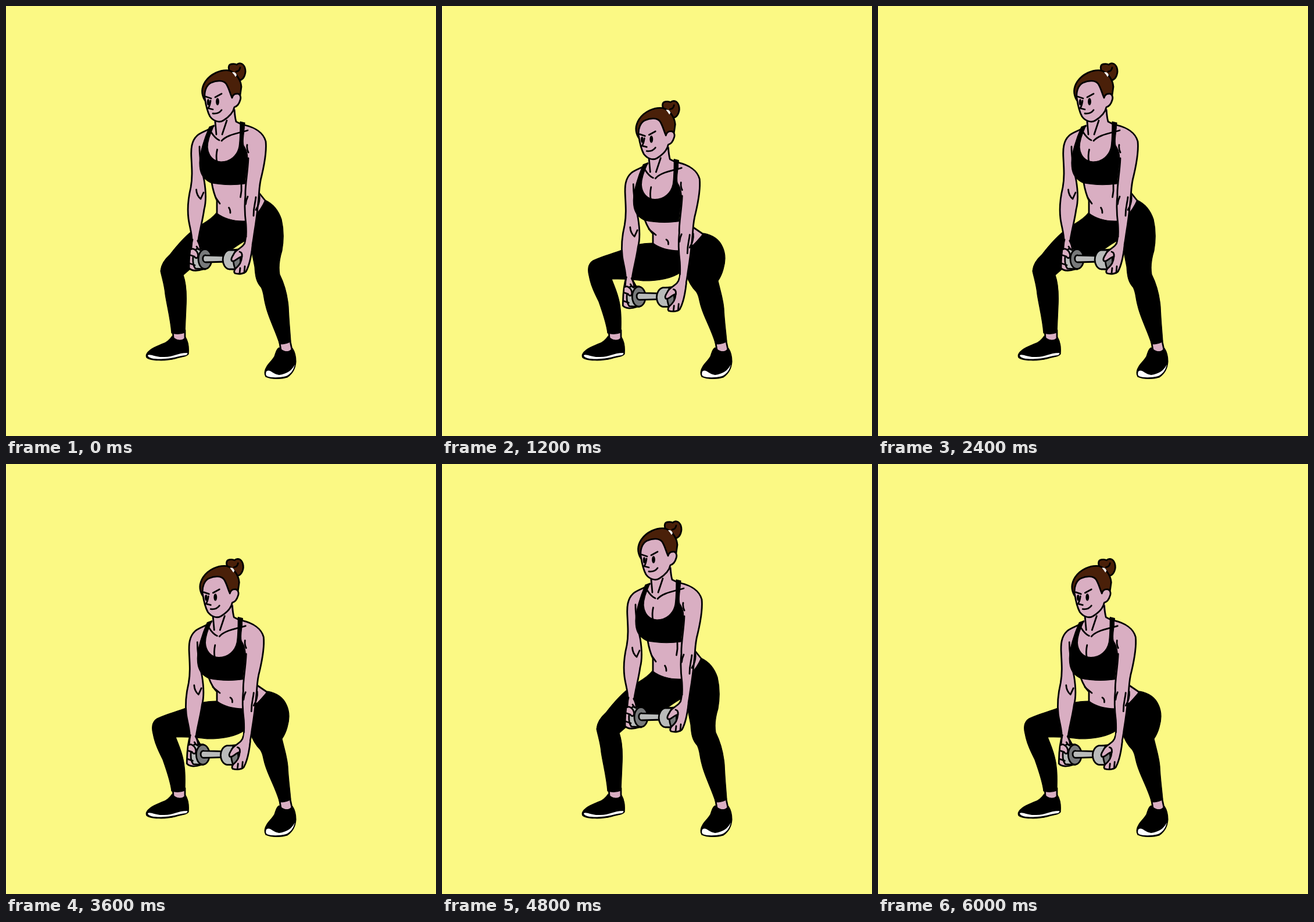
Recreate the animation shown at these times as an HTML page. Size 740 by 740 pixels, loop 7.2 s.

```html
<!DOCTYPE html>
<html lang="en">
<head>
<meta charset="utf-8">
<title>Dumbbell squat</title>
<style>
html, body { margin: 0; width: 100%; height: 100%; overflow: hidden; background: #fbf984; }
svg { display: block; width: 100vw; height: 100vh; }
.skin, .line, .hair, .steel, .dark { stroke: #000; stroke-width: 2.8; stroke-linecap: round; stroke-linejoin: round; }
.skin { fill: #d9aec2; }
.line { fill: none; }
.hair { fill: #4a2009; }
.steel { fill: #b9bbba; }
.dark { fill: #77797a; }
.sole { fill: #fff; }
.flat { fill: #d9aec2; }
.black { fill: #000; stroke: #000; stroke-width: 1.2; stroke-linejoin: round; }
</style>
</head>
<body>
<svg viewBox="0 0 740 740">
  <rect width="740" height="740" fill="#fbf984"/>

  <g id="ankles">
    <path class="skin" d="M287 558L288 572C293 578 304 578 308 572L308 558Z"/>
    <path class="skin" d="M470 574L473 592C478 597 488 597 492 591L488 572Z"/>
  </g>

  <g id="high">
    <path class="skin" d="M354 304C356 316 359 326 363 335L363 360L400 376L434 362L447 336L435 321L420 304Z"/>
    <path class="line" d="M361 330L368 340M383.500 347Q386 350 386 356M405 307Q406 318 403.500 329"/>
    <path class="black" d="M362 356C374 365 392 371 412 370L429 360Q439 350 446 334C459 340 469 352 474 367C478 384 478 404 475 421C470 437 469 450 471 462C479 478 484 495 486 517C487 542 489 560 490 577Q483 582 471 582C463 557 451 535 447 516C443 502 444 493 439 484C431 475 429 466 428 449L423 423L414 403C396 411 382 427 353 441L320 450L305 463C311 480 311 498 310 517L308 562Q297 566 285 563C283 538 277 516 274 496C273 482 269 470 266 456C267 444 273 436 282 428C296 410 311 393 326 383C338 374 352 369 362 356Z"/>
  </g>

  <g id="low">
    <rect width="1" height="740" fill="#fbfaa4"/>
    <path class="skin" d="M349 368C353 379 357 386 363 392L363 412L395 425L428 418L450 393L431 380L412 368Z"/>
    <path class="line" d="M356 384L368 394M386 402Q390 404 389.500 410"/>
    <path class="black" d="M363 408C374 416 390 421 408 421L426 416Q440 406 450 391C467 394 478 403 483 415C488 426 488 440 484 453Q481 464 475 473C478 487 483 500 485 520C486 543 489 562 490 577Q483 582 471 582C463 555 452 538 446 518C442 506 443 499 437 491C429 483 425 476 421 464L411 458C396 469 372 473 346 473Q318 469 292 470C297 484 305 499 307 521C309 535 308 550 308 562Q297 566 285 563C283 545 275 524 270 509C263 495 256 481 253 464C250 452 252 443 260 438C276 430 295 426 309 420C327 412 342 408 363 408Z"/>
  </g>

  <g id="shoes">
    <path class="black" d="M286 568C281 575 277 579 270 581C261 585 252 588 247 593C242 597 240 601 242 605C248 611 276 611 291 607C303 603 311 604 314 599C315 588 314 578 309 570C305 577 293 577 286 568Z"/>
    <path class="sole" d="M244 601C248 598 258 605 272 604C289 604 295 597 312 597Q313 600 309 601C299 602 286 607 267 607.500C252 608 244 605 244 601Z"/>
    <path class="black" d="M470 588C465 590 464 598 462 603C458 610 452 615 449 620C444 628 444 633 447 638C458 643 475 642 484 639C493 633 498 625 499 612C499 603 497 595 493 589C489 597 478 597 470 588Z"/>
    <path class="sole" d="M448 629C455 624 459 634 470 635C482 633 491 629 497 617C495 627 489 634 482 637C470 640 456 640 449 637Q446 634 448 629Z"/>
  </g>

  <g id="upper">
    <path class="flat" d="M358 206L361 190L392 178L396 199L412 204L420 250L411 306L352 304L333 260L334 224Z"/>
    <g id="leftArm">
      <path class="skin" d="M358 206C350 214 337 216 329 223C319 232 318 246 319 262C320 280 321 296 318 312C313 333 312 350 314 366C316 382 321 392 320 410L330 410C332 390 338 372 341 350C345 335 344 318 341 300C338 285 333 270 333 242"/>
      <path class="line" d="M327.500 316Q328 326 335 332L340 321"/>
    </g>
    <g id="bra">
      <path class="black" d="M350 208L358 205C353 218 347 230 347 243C348 257 356 267 370 268C386 268 398 257 401 242C403 229 403 213 403 199L411 201C411 214 406 231 409 240Q416 250 416 264L411 306C390 309 370 308 352 304C338 297 333 287 333 270C333 254 341 228 350 208Z"/>
      <path class="line" d="M363.500 247Q361 258 363 269"/>
    </g>
    <g id="rightArm">
      <path class="flat" d="M411 205L447 233L440 292L413 306L417 255L410 238Z"/>
      <path class="skin" d="M411 205C428 209 443 218 447 233C449 252 444 275 440 292C436 306 436 316 435 328C433 350 430 374 427 392Q425 408 422 420L409 420C413 409 414 392 413 376C411 360 410 343 412 326C411 310 416 288 417 262"/>
      <path class="line" d="M415 239Q414 246 417 252M416 328Q413 334 412.500 341M430 329C429 340 426 345 426 361M436 327C437 337 433 346 430 351M416 404Q414 411 410 415"/>
    </g>

    <g id="neck">
      <path class="flat" d="M357 193L361 222L374 230L397 208L395 176Z"/>
      <path class="line" d="M360 199L362 221M380 197L372 221M393 179Q394 192 396 199L404 203M353 217Q360 228 367 231M371 232C380 222 395 220 416 214"/>
    </g>

    <g id="head">
      <path class="hair" d="M386 114C382 108 382 101 388 100Q394 99 397 101C401 97 408 98 411 106C414 115 410 126 402 128L392 121Z"/>
      <path class="line" d="M403 106Q402 112 396 113"/>
      <path class="hair" d="M342 162C336 152 336 141 343 130C352 117 369 109 384 111C397 115 404 128 405 139L403 153L390 165L350 168Z"/>
      <path d="M389 114Q395 113 397 119L395 122Q392 117 389 114Z" fill="#fff"/>
      <path class="skin" d="M342 158C341 146 345 136 353 132C362 128 374 127 379 134C384 142 385 149 389 158Q391 151 397 151C403 150 405 157 403 162C401 169 397 173 393 174C391 184 382 192 374 197C366 202 356 197 351 190C346 181 344 171 342 158Z"/>
      <path class="line" stroke-width="2.4" d="M344 156L353 159M360 157L371 151M352 163Q351 171 348 176L356 178M356 185Q366 186 371 179"/>
      <ellipse cx="364" cy="164.500" rx="2.900" ry="6.300"/>
      <ellipse cx="348" cy="165.500" rx="2.300" ry="5.500"/>
    </g>

    <g id="dumbbell">
      <path class="skin" d="M321 402C316 417 315 438 315 451C320 457 331 456 339 453L341 424L330 404"/>
      <path class="steel" d="M343 418L328 418C320 424 320 445 326 452L343 453Z"/>
      <ellipse class="dark" cx="342.500" cy="435.500" rx="11.500" ry="17"/>
      <path class="steel" d="M344 429L380 430L380 440L344 441C337 441 337 428 344 429Z"/>
      <path class="dark" d="M390 420L400 419Q406 436 402 453L390 453Z"/>
      <path class="steel" d="M384 420L396 420C390 428 390 444 395 453L384 453C370 450 369 424 384 420Z"/>
      <path class="skin" d="M330 404Q335 414 334 420Q331 419 328 414M318 419C322 416 328 420 330 426C332 434 327 436 324 431L318 429"/>
      <path class="line" d="M316 443L325 446M320 405L319 416"/>
      <path class="skin" d="M412 404C411 414 398 418 393 425C389 432 386 436 389 439C394 441 398 433 406 431C405 441 402 446 395 452Q391 457 394 460C401 462 409 461 413 457C419 446 422 432 424 413"/>
      <path class="line" d="M406 431Q407 424 402 423M403 451L402 460M411 448L410 459"/>
      <path class="flat" d="M414 398L424 398L421 422L411 416Z"/>
    </g>
  </g>
</svg>
<script>
const HOLD = 1200;
const get = id => document.getElementById(id);
const high = get("high"), low = get("low"), upper = get("upper");

function draw(time) {
  const squat = Math.floor(time / HOLD) % 2 === 1;
  high.style.display = squat ? "none" : "";
  low.style.display = squat ? "" : "none";
  upper.setAttribute("transform", squat ? "translate(-3.700 64.700)" : "");
}

const start = performance.now();
function tick() {
  draw(performance.now() - start);
  requestAnimationFrame(tick);
}
tick();
</script>
</body>
</html>
```
